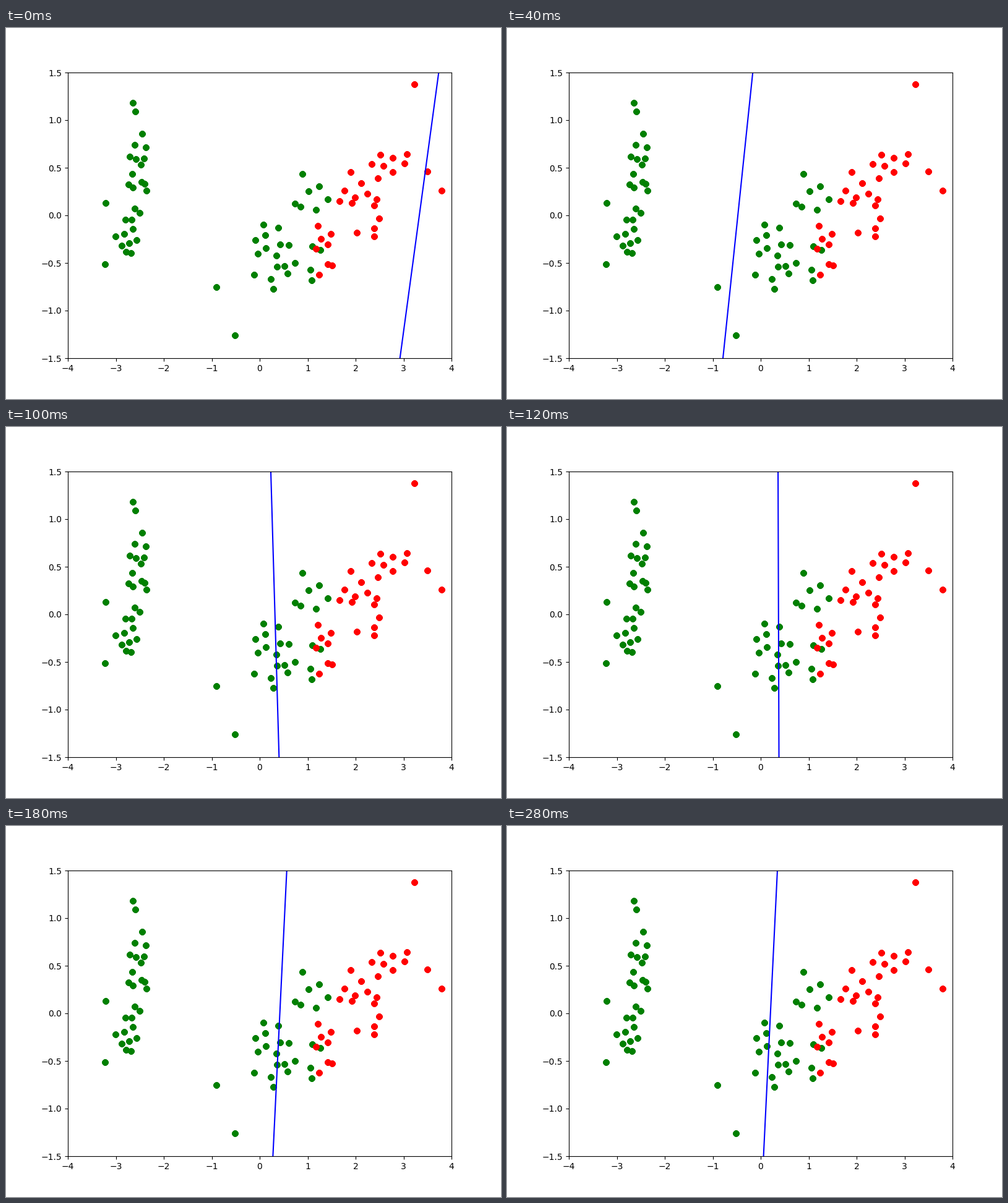
A matplotlib script for the animation above (320 ms loop, 800 by 600 pixels).

```python
import numpy as np
import matplotlib.pyplot as plt
from matplotlib.animation import FuncAnimation

STEP = 20      # ms
FRAMES = 16
GOLDEN = np.pi * (3 - np.sqrt(5))

rng = np.random.default_rng(4)


def blob(n, center, spread, tilt=0.0):
    """Evenly filled elliptic cluster with a little angular jitter."""
    i = np.arange(n)
    r = 2 * np.sqrt((i + 0.5) / n)
    angle = i * GOLDEN + rng.uniform(-0.5, 0.5, n)
    a, b = r * np.cos(angle), r * np.sin(angle)
    b = tilt * a + np.sqrt(1 - tilt ** 2) * b
    return np.column_stack([a, b]) * spread + center


green = np.vstack([
    blob(13, (-2.52, 0.50), (0.12, 0.20)),
    blob(12, (-2.71, -0.18), (0.17, 0.13), 0.4),
    blob(16, (0.25, -0.42), (0.27, 0.18)),
    blob(11, (1.09, 0.02), (0.19, 0.36)),
    # far points that give the clusters their outline
    [(-2.645, 1.179), (-2.599, 1.093), (-3.216, 0.133), (-3.224, -0.511),
     (-0.908, -0.752), (-0.511, -1.262)],
])
red = np.vstack([
    blob(8, (1.36, -0.34), (0.12, 0.17)),
    blob(4, (2.25, -0.16), (0.19, 0.07), 0.5),
    blob(17, (2.33, 0.36), (0.39, 0.18), 0.6),
    [(3.231, 1.374), (3.500, 0.461), (3.796, 0.257)],
])

# boundary: x where it meets the bottom and top edges, settling with a pause
times = [0, 20, 60, 100, 160, 220, 260, 280]
bottom = [2.925, -1.471, -0.103, 0.404, 0.335, 0.157, 0.157, 0.059]
top = [3.733, -0.499, 0.168, 0.232, 0.622, 0.449, 0.449, 0.348]

fig, ax = plt.subplots(figsize=(8, 6), dpi=100)
ax.set(xlim=(-4, 4), ylim=(-1.5, 1.5))


def dots(points, color, layers=60):
    # stacked layers harden the marker edges
    x, y = np.tile(points, (layers, 1)).T
    ax.scatter(x, y, c=color)


dots(green, "green")
dots(red, "red")
line, = ax.plot([], [], color="blue", lw=1.5)


def draw(i):
    t = i * STEP
    low, high = np.interp(t, times, bottom), np.interp(t, times, top)
    # extend past both edges so the frame clips the line
    reach = (high - low) / 6
    line.set_data([low - reach, high + reach], [-2, 2])
    return line,


anim = FuncAnimation(fig, draw, frames=FRAMES, interval=STEP,
                     repeat=True, repeat_delay=0)
plt.show()
```
